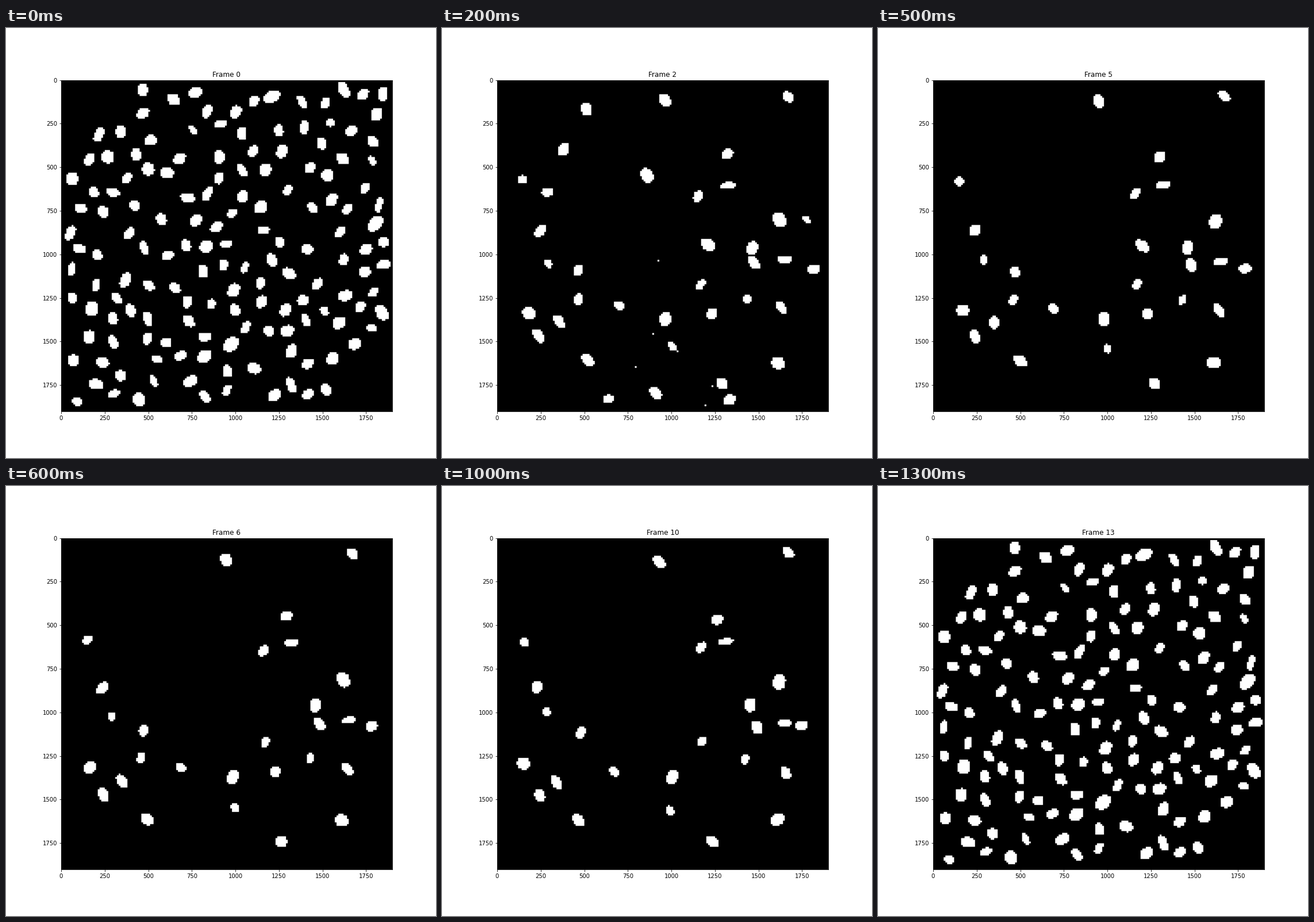
Animation, 748 px wide and 748 px high, one loop 1.4 s. Source, as a matplotlib script:

```python
import numpy as np
import matplotlib.pyplot as plt
from matplotlib.animation import FuncAnimation

STAGE, DPI = 748, 72
AXES_LEFT, AXES_BOTTOM, AXES_SIZE = 95.8, 81.45, 576
CELLS, CELL_SIZE = 190, 10
FRAMES, MIDDLE = 14, 5
FIELD_COUNT, FADING_COUNT, SPECK_COUNT = 149, 25, 22

# Mean place of each tracked blob, in grid cells; the last FLEETING ones get lost.
HOMES = [(167, 9), (95, 12), (130, 44), (132, 60), (116, 65), (15, 58),
         (162, 81), (24, 86), (29, 103), (47, 110), (117, 117), (146, 96),
         (148, 106), (165, 104), (179, 108), (143, 126), (164, 132), (17, 132),
         (69, 131), (35, 139), (24, 147), (98, 137), (100, 154), (50, 161),
         (161, 162), (127, 174), (179, 81), (120, 95), (46, 126), (123, 134)]
FLEETING = 4

ROWS, COLS = np.mgrid[:CELLS, :CELLS] + 0.5


def add_blob(grid, x, y, width, height, slant):
    """Light the cells of a slanted, rounded block."""
    dy = ROWS - y
    dx = COLS - x + slant * dy
    grid[abs(2 * dx / width) ** 2.5 + abs(2 * dy / height) ** 2.5 < 1] = 1


def random_shape(rng):
    width, height = np.clip(rng.normal((6.2, 6.5), 1.1), 4, 9)
    return width, height, rng.uniform(-.4, .4)


def scatter(rng, count, gap, taken=()):
    """Random points that keep a gap, leaving two opposite corners empty."""
    points = list(taken)
    while len(points) < len(taken) + count:
        u, v = rng.uniform(-.95, .95, 2)
        point = (np.array([u, v]) + 1) * CELLS / 2
        if abs(u + v) < 1.5 and all(np.hypot(*(point - p)) > gap for p in points):
            points.append(point)
    return points[len(taken):]


def draw_field(grid):
    rng = np.random.default_rng(4)
    for point in scatter(rng, FIELD_COUNT, 10.5):
        add_blob(grid, *point, *random_shape(rng))


def draw_tracks(grid, frame):
    steady = len(HOMES) - FLEETING
    for i, home in enumerate(HOMES):
        if i >= steady and frame > 3 + 2 * (i - steady):
            continue
        rng = np.random.default_rng(i)
        width, height, slant = random_shape(rng)
        x, y = home + rng.normal(0, .3, 2) * (frame - MIDDLE)
        wobble = np.random.default_rng([i, frame]).uniform(-.2, .2, 3)
        add_blob(grid, x, y, width + wobble[0], height + wobble[1],
                 slant + wobble[2])


def draw_fading(grid, frame):
    """Short-lived blobs and single-cell specks that thin out quickly."""
    rng = np.random.default_rng(8)
    keep = 4 ** (frame - 1)
    for point in scatter(rng, FADING_COUNT, 11, HOMES)[::keep]:
        add_blob(grid, *point, *random_shape(rng))
    specks = rng.integers((85, 65), (CELLS, 140), (SPECK_COUNT, 2))[::keep]
    grid[tuple(specks.T)] = 1


def render(frame):
    grid = np.zeros((CELLS, CELLS), dtype=np.uint8)
    if frame in (0, FRAMES - 1):
        draw_field(grid)
    else:
        draw_tracks(grid, frame)
        if frame <= 2:
            draw_fading(grid, frame)
    return grid.repeat(CELL_SIZE, axis=0).repeat(CELL_SIZE, axis=1)


fig = plt.figure(figsize=(STAGE / DPI, STAGE / DPI), dpi=DPI)
ax = fig.add_axes([AXES_LEFT / STAGE, AXES_BOTTOM / STAGE,
                   AXES_SIZE / STAGE, AXES_SIZE / STAGE])
image = ax.imshow(render(0), cmap="gray", vmin=0, vmax=1)
title = ax.set_title("Frame 0")


def update(frame):
    image.set_data(render(frame))
    title.set_text(f"Frame {frame}")
    return image, title


animation = FuncAnimation(fig, update, frames=FRAMES, interval=100,
                          repeat=True, repeat_delay=0)
plt.show()
```
